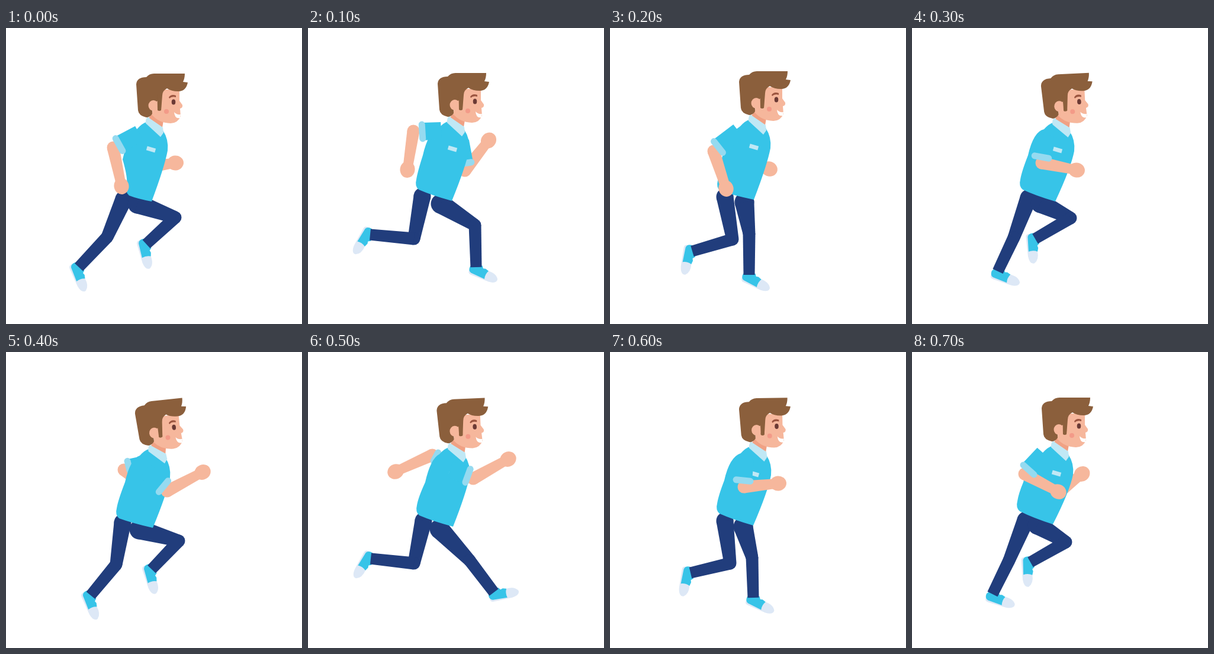
Recreate the animation shown at these times as an HTML page with a canvas. Size 500 px wide and 500 px high, loop 800 ms.

```html
<!DOCTYPE html>
<html lang="en">
<head>
<meta charset="utf-8">
<title>Running man</title>
<style>
html, body { margin: 0; height: 100%; overflow: hidden; background: #fff; }
canvas { display: block; width: 100vmin; height: 100vmin; }
</style>
</head>
<body>
<canvas width="500" height="500"></canvas>
<script>
const ctx = document.querySelector('canvas').getContext('2d');
const STEP = 100;
const C = {
  hair: '#8b5f3c', skin: '#f6b79c', neck: '#f0a184', shirt: '#37c4e8', cuff: '#95daf0',
  collar: '#c0e8f5', pants: '#213d7c', sole: '#dde8f6', eye: '#6b3a35', brow: '#9c5540', cheek: '#f39a88'
};

// head: pivot x, y, tilt. torso: hem back, hem front, middle of the back.
// arms: shoulder, cuff, elbow, hand. legs: hip, knee, ankle, foot angle.
const poses = [
  { head: [255, 155, 0], torso: [204, 280, 246, 293, 197, 222],
    near: [225, 178, 191, 197, 181, 202, 195, 267], far: [255, 190, 246, 215, 250, 233, 286, 228],
    back: [199, 289, 171, 353, 123, 404, 64], front: [222, 297, 286, 320, 237, 365, 72] },
  { head: [254, 154, 0], torso: [183, 270, 243, 292, 194, 215],
    near: [225, 173, 193, 175, 178, 174, 168, 239], far: [262, 190, 268, 228, 265, 241, 305, 190],
    back: [193, 284, 179, 356, 105, 349, 117], front: [224, 297, 282, 333, 284, 404, 20] },
  { head: [253, 151, 0], torso: [182, 272, 243, 290, 189, 220],
    near: [217, 174, 183, 201, 175, 208, 196, 271], far: [250, 190, 244, 215, 248, 230, 269, 238],
    back: [194, 285, 207, 357, 139, 377, 97], front: [227, 294, 235, 347, 235, 417, 23] },
  { head: [256, 156, -3], torso: [183, 270, 242, 293, 196, 215],
    near: [226, 180, 219, 218, 219, 228, 278, 240], far: [240, 185, 222, 205, 215, 213, 238, 235],
    back: [197, 287, 172, 354, 145, 411, 17], front: [217, 296, 268, 321, 208, 356, 82] },
  { head: [259, 160, -6], torso: [187, 278, 248, 297, 201, 220],
    near: [235, 201, 266, 227, 272, 235, 332, 203], far: [235, 185, 207, 192, 199, 199, 230, 225],
    back: [197, 288, 186, 359, 143, 411, 64], front: [225, 300, 292, 319, 246, 367, 70] },
  { head: [255, 157.5, -2.5], torso: [184, 273, 245, 295, 198, 220],
    near: [240, 198, 270, 209, 279, 214, 338, 181], far: [240, 190, 216, 177, 210, 174, 148, 202],
    back: [195, 285, 179, 357, 106, 349, 117], front: [222, 299, 273, 352, 314, 406, -14] },
  { head: [254, 156, -1], torso: [181, 270, 242, 293, 193, 217],
    near: [229, 180, 225, 217, 226, 228, 284, 222], far: [240, 185, 220, 203, 213, 210, 238, 236],
    back: [194, 285, 203, 357, 136, 373, 97], front: [225, 295, 240, 347, 242, 415, 22] },
  { head: [254, 155, 0], torso: [178, 266, 238, 291, 188, 220],
    near: [222, 171, 197, 199, 190, 206, 247, 236], far: [255, 190, 250, 215, 256, 230, 287, 206],
    back: [192, 284, 164, 352, 136, 409, 15], front: [212, 292, 260, 321, 200, 355, 84] }
];

const shapes = {
  neck: 'M246 145 L241 152 L264 168 L266 157Z',
  collar: 'M239 150 Q235 155 236 161 L261 184 L266 177 L265 168 L246 155Z',
  face: 'M256 104 L293 104 L293 123 L298 130 Q299 135 294 136 L295 149 Q290 161 278 161 Q257 160 246 146Z',
  hair: 'M220 95 Q221 83 237 83 Q242 77 250 77 L302 77 Q302 85 299 91 L307 92 ' +
    'Q304 107 291 107 Q279 107 272 102 Q264 106 264 114 L262 139 Q259 141 256 139 L256 123 ' +
    'Q246 128 247 145 Q243 151 237 151 Q224 148 223 139Z',
  smile: 'M284 142 Q288 147 295 146 L294 152 Q285 154 284 142Z',
  brow: 'M275 117 Q279 111 287 114 L287 117 Q280 115 276 119Z',
  sole: 'M-9 6 Q-11 15 -4 15 L28 16 Q42 15 41 7 Q36 -2 21 -1 L18 10Z',
  shoe: 'M-10 2 Q-5 -6 0 -4 L9 -6 L12 -2 L16 -3 L22 -1 Q18 6 20 14 L-5 12 Q-11 10 -10 2Z'
};
for (const k in shapes) shapes[k] = new Path2D(shapes[k]);

function fill(path, color) {
  ctx.fillStyle = color;
  ctx.fill(path);
}

function oval(x, y, rx, ry, color, angle = 0) {
  ctx.fillStyle = color;
  ctx.beginPath();
  ctx.ellipse(x, y, rx, ry, angle, 0, 7);
  ctx.fill();
}

// Tapered bar between two points with half widths a and b.
function bar(x1, y1, a, x2, y2, b, color) {
  const t = Math.atan2(y2 - y1, x2 - x1), s = Math.sin(t), c = Math.cos(t);
  ctx.fillStyle = color;
  ctx.beginPath();
  ctx.moveTo(x1 - s * a, y1 + c * a);
  ctx.lineTo(x2 - s * b, y2 + c * b);
  ctx.lineTo(x2 + s * b, y2 - c * b);
  ctx.lineTo(x1 + s * a, y1 - c * a);
  ctx.fill();
}

function placed(x, y, degrees, draw) {
  ctx.save();
  ctx.translate(x, y);
  ctx.rotate(degrees * Math.PI / 180);
  draw();
  ctx.restore();
}

function leg([hx, hy, kx, ky, ax, ay, foot], hip) {
  placed(ax, ay, foot, () => {
    fill(shapes.sole, C.sole);
    fill(shapes.shoe, C.shirt);
  });
  oval(hx, hy, hip, hip, C.pants);
  bar(hx, hy, hip, kx, ky, 10.5, C.pants);
  oval(kx, ky, 10.5, 10.5, C.pants);
  bar(kx, ky, 10.5, ax, ay, 9.5, C.pants);
}

function arm([sx, sy, cx, cy, ex, ey, hx, hy], cuff) {
  oval(ex, ey, 10.5, 10.5, C.skin);
  bar(ex, ey, 10.5, hx, hy, 8, C.skin);
  oval(hx, hy, 14, 12.5, C.skin, Math.atan2(hy - ey, hx - ex));
  bar(sx, sy, cuff + 2, cx, cy, cuff + 3, C.shirt);
  const t = Math.atan2(cy - sy, cx - sx), dx = Math.sin(t) * cuff, dy = -Math.cos(t) * cuff;
  ctx.strokeStyle = C.cuff;
  ctx.lineWidth = 11;
  ctx.lineCap = 'round';
  ctx.beginPath();
  ctx.moveTo(cx - dx, cy - dy);
  ctx.lineTo(cx + dx, cy + dy);
  ctx.stroke();
}

function torso([x, y], [bx, by, fx, fy, mx, my]) {
  ctx.fillStyle = C.shirt;
  ctx.beginPath();
  ctx.moveTo(x - 18, y + 4);
  ctx.lineTo(x + 10, y + 18);
  ctx.quadraticCurveTo(x + 20, y + 33, x + 18, y + 52);
  ctx.quadraticCurveTo(x + 13, y + 79, fx, fy);
  ctx.quadraticCurveTo((bx + fx) / 2 - 3, (by + fy) / 2 + 2, bx + 4, by + 3);
  ctx.quadraticCurveTo(bx - 3, by - 3, bx, by - 14);
  ctx.quadraticCurveTo(bx + 2, by - 27, mx, my);
  ctx.quadraticCurveTo(mx + 9, my - 40, x - 33, y + 15);
  ctx.quadraticCurveTo(x - 25, y + 6, x - 18, y + 4);
  ctx.fill();
}

function head([x, y, tilt]) {
  placed(x, y, tilt, () => {
    ctx.translate(-255, -155);
    fill(shapes.neck, C.neck);
    fill(shapes.collar, C.collar);
    fill(shapes.face, C.skin);
    fill(shapes.hair, C.hair);
    oval(249, 131, 8.5, 9, C.skin);
    bar(259, 112, 3.5, 259, 138, 3, C.hair);
    fill(shapes.smile, '#fff');
    fill(shapes.brow, C.brow);
    oval(283, 125, 3.3, 4.5, C.eye);
    oval(271, 141, 4, 4, C.cheek);
  });
}

function draw(p) {
  ctx.fillStyle = '#fff';
  ctx.fillRect(0, 0, 500, 500);
  arm(p.far, 8);
  leg(p.back, 14.5);
  leg(p.front, 16.5);
  torso(p.head, p.torso);
  placed(p.head[0] - 10, p.head[1] + 50, 16, () => {
    ctx.fillStyle = C.collar;
    ctx.fillRect(-7.5, -3.5, 15, 7);
  });
  arm(p.near, 12);
  head(p.head);
}

function tick() {
  draw(poses[Math.floor(performance.now() / STEP) % poses.length]);
  requestAnimationFrame(tick);
}
tick();
</script>
</body>
</html>
```
